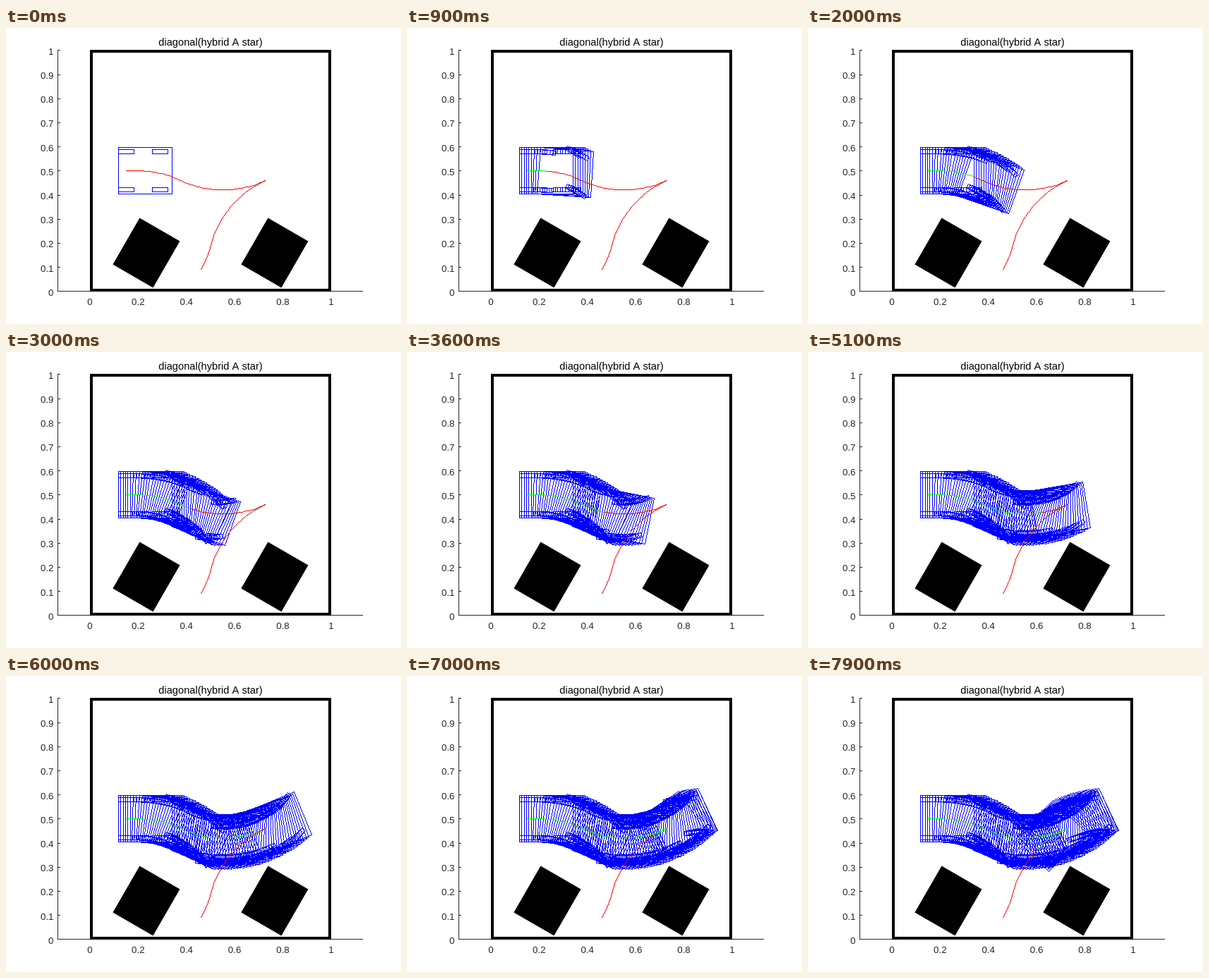
These frames come from a looping animation (560 px wide and 420 px high, 8 s). An HTML page with a canvas:

```html
<!DOCTYPE html>
<html>
<head>
<meta charset="utf-8">
<style>
html, body { margin: 0; overflow: hidden; background: #fff; }
canvas { display: block; }
</style>
</head>
<body>
<canvas id="stage" width="560" height="420"></canvas>
<script>
const ctx = document.getElementById('stage').getContext('2d');
const STEP = 0.01, RADIUS = 0.412, STEER = Math.PI / 6;
const FRAME_MS = 100, FRAMES = 80;
const FONT = '"Liberation Sans", Arial, sans-serif';
const BODY = [-0.032, 0.1905, 0.0963]; // back, front, half width

// Plot units to pixels
const px = x => 118.9 + 342 * x;
const py = y => 373.8 - 342 * y;

// Path pieces: length, turn (1 left, -1 right), gear (-1 reverse)
const pieces = [
  [0.05, 0, 1],
  [0.182, -1, 1],
  [0.3614, 1, 1],
  [0.3614, -1, -1],
  [0.1094, 1, -1]
];

function advance(p, s, turn, gear) {
  const a = p.a + turn * gear * s / RADIUS;
  if (!turn) {
    return { x: p.x + gear * s * Math.cos(a), y: p.y + gear * s * Math.sin(a), a, steer: 0 };
  }
  const r = RADIUS * turn;
  return {
    x: p.x + r * (Math.sin(a) - Math.sin(p.a)),
    y: p.y + r * (Math.cos(p.a) - Math.cos(a)),
    a,
    steer: turn * STEER
  };
}

function buildPoses() {
  const poses = [];
  let start = { x: 0.15, y: 0.5, a: 0 };
  for (const [len, turn, gear] of pieces) {
    const count = Math.ceil(len / STEP - 1e-6);
    for (let i = 0; i <= count; i++) {
      poses.push(advance(start, Math.min(i * STEP, len), turn, gear));
    }
    start = poses[poses.length - 1];
  }
  return poses;
}

// Crisp one-pixel line without smoothing
function line(x0, y0, x1, y1) {
  x0 = Math.floor(x0); y0 = Math.floor(y0);
  x1 = Math.floor(x1); y1 = Math.floor(y1);
  const n = Math.max(Math.abs(x1 - x0), Math.abs(y1 - y0), 1);
  for (let i = 0; i <= n; i++) {
    ctx.fillRect(Math.round(x0 + (x1 - x0) * i / n), Math.round(y0 + (y1 - y0) * i / n), 1, 1);
  }
}

const link = (p, q) => line(px(p.x), py(p.y), px(q.x), py(q.y));

// Point given ahead and to the left of a pose
function offset(p, ahead, left) {
  const c = Math.cos(p.a), s = Math.sin(p.a);
  return { x: p.x + ahead * c - left * s, y: p.y + ahead * s + left * c };
}

function corners(p, [back, front, half]) {
  return [[back, half], [front, half], [front, -half], [back, -half]]
    .map(([ahead, left]) => offset(p, ahead, left));
}

function box(p, size) {
  corners(p, size).forEach((q, i, all) => link(q, all[(i + 1) % 4]));
}

function drawCar(p) {
  ctx.fillStyle = '#00f';
  box(p, BODY);
  for (const [ahead, steer] of [[0.001, 0], [0.141, p.steer]]) {
    for (const left of [0.079, -0.079]) {
      box({ ...offset(p, ahead, left), a: p.a + steer }, [-0.033, 0.033, 0.0088]);
    }
  }
}

function drawParked(x) {
  ctx.beginPath();
  for (const q of corners({ x, y: 0.0915, a: Math.PI / 3 }, BODY)) ctx.lineTo(px(q.x), py(q.y));
  ctx.fill();
}

function drawScene() {
  ctx.fillStyle = '#fff';
  ctx.fillRect(0, 0, 560, 420);

  ctx.fillStyle = '#262626';
  ctx.fillRect(73, 31, 1, 343);
  ctx.fillRect(73, 373, 433, 1);
  ctx.font = '13.33px ' + FONT;
  for (let i = 0; i <= 10; i++) {
    const y = py(i / 10);
    ctx.fillRect(73, Math.floor(y), 4, 1);
    ctx.textAlign = 'right';
    ctx.fillText(i / 10, 67.5, Math.round(y) + 5.5);
    if (i % 2 === 0) {
      ctx.textAlign = 'center';
      ctx.fillText(i / 10, px(i / 10), 393);
    }
  }

  ctx.fillStyle = '#000';
  ctx.font = '14.67px ' + FONT;
  ctx.fillText('diagonal(hybrid A star)', 290, 25);
  ctx.lineWidth = 4;
  ctx.strokeRect(121, 33, 338, 339);
  drawParked(0.1945);
  drawParked(0.7265);
}

// Travelled part green, the rest red, both above the cars
function drawPath(n) {
  ctx.fillStyle = '#f00';
  for (let i = n + 1; i < poses.length; i++) link(poses[i - 1], poses[i]);
  ctx.fillStyle = '#0f0';
  for (let i = 1; i <= n; i++) link(poses[i - 1], poses[i]);
}

const poses = buildPoses();
let drawn = FRAMES + 1;

// Cars pile up, so only the missing ones are added
function show(n) {
  if (n + 1 === drawn) return;
  if (n + 1 < drawn) {
    drawScene();
    drawn = 0;
  }
  while (drawn <= n) drawCar(poses[drawn++]);
  drawPath(n);
}

const began = performance.now();
function tick() {
  show(Math.floor((performance.now() - began) / FRAME_MS) % FRAMES);
  requestAnimationFrame(tick);
}
tick();
</script>
</body>
</html>
```
